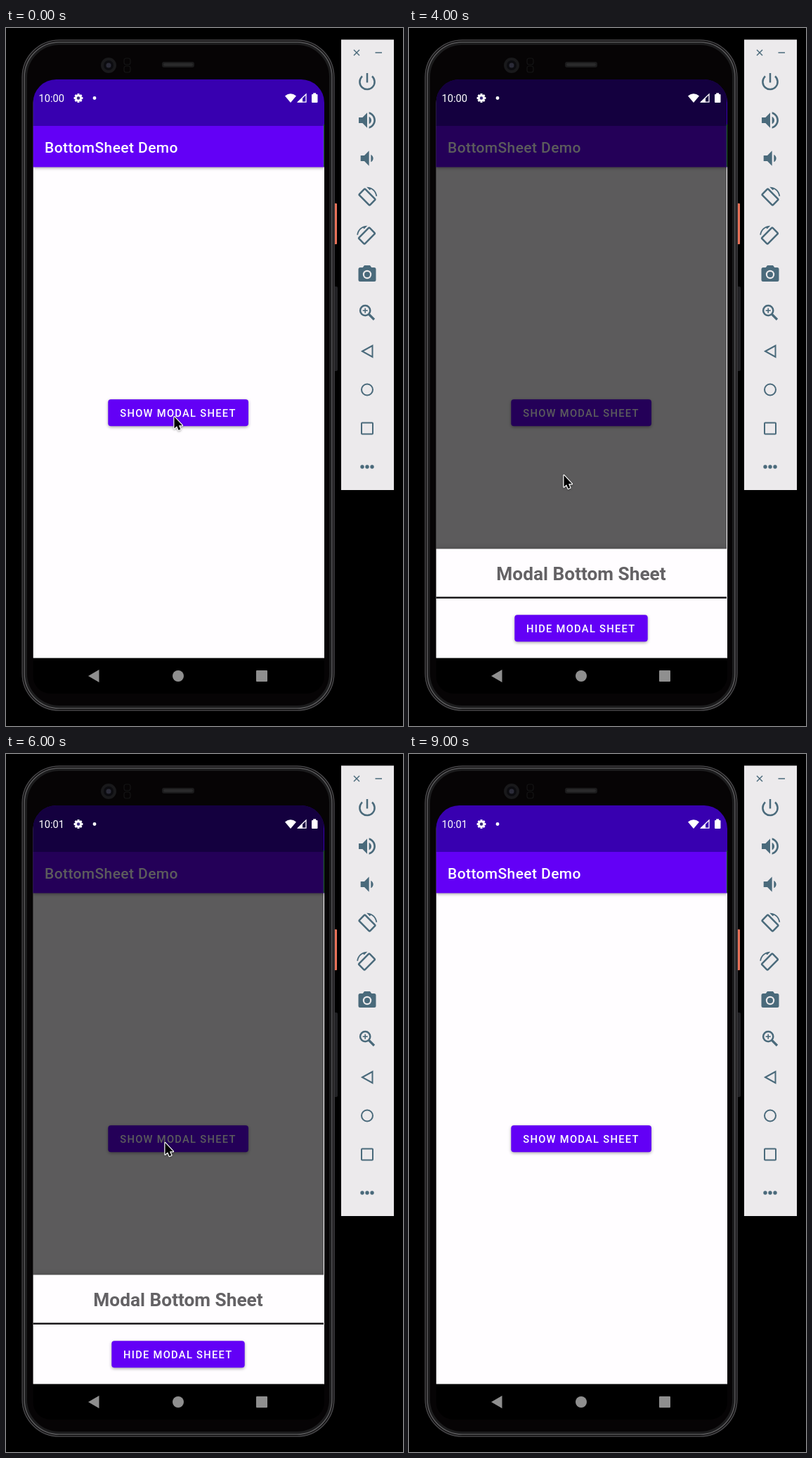
Recreate the animation shown at these times as an HTML page with a canvas. Size 565 px wide and 991 px high, loop 9100 ms.

```html
<!DOCTYPE html>
<html lang="en">
<head>
<meta charset="utf-8">
<title>BottomSheet Demo</title>
<style>
html, body { margin: 0; width: 100%; height: 100%; overflow: hidden; background: #000; }
canvas { display: block; width: 565px; height: 991px; }
</style>
</head>
<body>
<canvas id="stage" width="565" height="991"></canvas>
<script>
const W = 565, H = 991, LOOP = 9100, STEP = 100;
const FONT = 'Roboto, "Noto Sans", sans-serif';
const PURPLE = '#6300f6', SLATE = '#4a6a7b', PANEL = '#eceaec';
const SCREEN = { x: 38.5, y: 73, r: 453, b: 945 };
const NAV_Y = 894.5, SHEET_Y = 739.5, TRAVEL = 150, DIM = 0.64;

const stage = document.getElementById('stage').getContext('2d');

function layer(draw) {
  const c = document.createElement('canvas');
  c.width = W;
  c.height = H;
  draw(c.getContext('2d'));
  return c;
}

function box(g, x, y, w, h, r, fill) {
  g.beginPath();
  g.roundRect(x, y, w, h, r);
  g.fillStyle = fill;
  g.fill();
}

function ring(g, x, y, w, h, r, color, width) {
  g.beginPath();
  g.roundRect(x, y, w, h, r);
  g.strokeStyle = color;
  g.lineWidth = width;
  g.stroke();
}

function disc(g, x, y, r, fill) {
  g.beginPath();
  g.arc(x, y, r, 0, 7);
  g.fillStyle = fill;
  g.fill();
}

function arc(g, x, y, r, from, to, color, width) {
  g.beginPath();
  g.arc(x, y, r, from, to);
  g.strokeStyle = color;
  g.lineWidth = width;
  g.stroke();
}

function trace(g, pts, closed) {
  g.beginPath();
  pts.forEach(([x, y], i) => i ? g.lineTo(x, y) : g.moveTo(x, y));
  if (closed) g.closePath();
}

function poly(g, pts, fill) {
  trace(g, pts, true);
  g.fillStyle = fill;
  g.fill();
}

function line(g, pts, color, width, closed) {
  trace(g, pts, closed);
  g.strokeStyle = color;
  g.lineWidth = width;
  g.stroke();
}

function text(g, str, x, y, weight, size, color, spacing = 0, align = 'left') {
  g.font = `${weight} ${size}px ${FONT}`;
  g.letterSpacing = spacing + 'px';
  g.textAlign = align;
  g.fillStyle = color;
  g.fillText(str, x, y);
}

function button(g, label, x, y, w, tx) {
  g.save();
  g.shadowColor = 'rgba(0,0,0,.35)';
  g.shadowBlur = 4;
  g.shadowOffsetY = 1.5;
  box(g, x, y, w, 38, 4, PURPLE);
  g.restore();
  text(g, label, tx, y + 25, 500, 14.7, '#fff', 1.28);
}

// 24-unit icon path centred on (x, y)
function icon(g, d, x, y, scale) {
  g.save();
  g.translate(x, y);
  g.scale(scale, scale);
  g.translate(-12, -12);
  g.fillStyle = SLATE;
  g.fill(new Path2D(d));
  g.restore();
}

function rotateIcon(g, x, y, flip) {
  g.save();
  g.translate(x, y);
  g.scale(flip, 1);
  icon(g, 'M16.48 2.52c3.27 1.55 5.61 4.72 5.97 8.48h1.5C23.44 4.84 18.29 0 12 0l-.66.03 3.81 3.81 1.33-1.32z', 0, 0, 1.19);
  g.rotate(Math.PI / 4);
  ring(g, -10.8, -6, 21.6, 12, 1.5, SLATE, 2.5);
  g.restore();
}

// Concentric outline of the phone body
function rim(g, inset, color, width) {
  ring(g, 22 + inset, 16 + inset, 446 - 2 * inset, 954 - 2 * inset, 54 - inset, color, width);
}

function drawPhone(g) {
  g.fillStyle = '#000';
  g.fillRect(0, 0, W, H);
  box(g, 466, 367, 6, 120, 2, '#222225');
  box(g, 466, 249, 5, 58, 1, '#ea7259');
  box(g, 22, 16, 446, 954, 54, '#060405');
  rim(g, 6, '#1c1c1d', 4);
  rim(g, 4, '#58585a', 1.6);
  rim(g, 1.2, '#444446', 1.6);

  disc(g, 146, 53, 11, '#19191b');
  disc(g, 146, 53, 7, '#0c0c10');
  disc(g, 146, 53, 3.5, '#2b2b38');
  ring(g, 168, 43, 9, 9, 3, '#141415', 1.2);
  ring(g, 168, 54, 9, 9, 3, '#141415', 1.2);
  box(g, 222, 48, 46, 8, 3, '#1b1b1c');
  box(g, 224, 50, 42, 4, 2, '#2a2a2b');
}

function drawToolbar(g) {
  const cx = 514;
  g.fillStyle = PANEL;
  g.fillRect(477, 16.5, 75, 639.5);
  line(g, [[495, 31], [503, 39]], SLATE, 1.4);
  line(g, [[503, 31], [495, 39]], SLATE, 1.4);
  line(g, [[525.5, 35], [535, 35]], SLATE, 1.5);

  arc(g, cx, 76.5, 10.6, -0.85, Math.PI + 0.85, SLATE, 2.5);
  line(g, [[cx, 64], [cx, 77.5]], SLATE, 2.5);

  const wave = 'm13.5 3c0-1.77-1.02-3.29-2.5-4.03v8.05c1.48-.73 2.5-2.25 2.5-4.02z';
  icon(g, 'M3 9v6h4l5 5V4L7 9H3z' + wave +
    'M14 3.23v2.06c2.89.86 5 3.54 5 6.71s-2.11 5.85-5 6.71v2.06c4.01-.91 7-4.49 7-8.77s-2.99-7.86-7-8.77z',
    cx, 131, 1.33);
  icon(g, 'M5 9v6h4l5 5V4L9 9H5z' + wave, cx, 185, 1.33);

  rotateIcon(g, cx, 240, 1);
  rotateIcon(g, cx - 0.5, 295, -1);

  poly(g, [[507, 341], [510, 337], [518, 337], [521, 341]], SLATE);
  box(g, 501.5, 340, 25, 20, 2.5, SLATE);
  disc(g, cx, 350, 6.2, PANEL);
  disc(g, cx, 350, 4, SLATE);

  arc(g, 511.2, 401.2, 7.1, 0, 7, SLATE, 2.5);
  line(g, [[516.5, 406.5], [524, 414]], SLATE, 3.2);
  line(g, [[507.7, 401.2], [514.7, 401.2]], SLATE, 1.6);
  line(g, [[511.2, 397.7], [511.2, 404.7]], SLATE, 1.6);

  line(g, [[507, 459], [521.5, 451], [521.5, 467]], SLATE, 2, true);
  arc(g, cx, 513.5, 8, 0, 7, SLATE, 2);
  ring(g, 506, 560.5, 16, 16, 1, SLATE, 2);
  for (const dx of [-7, 0, 7]) disc(g, cx + dx, 623, 2.7, SLATE);
}

function drawApp(g) {
  const w = SCREEN.r - SCREEN.x;
  g.fillStyle = '#000';
  g.fillRect(SCREEN.x, SCREEN.y, w, SCREEN.b - SCREEN.y);
  g.fillStyle = '#fffdff';
  g.fillRect(SCREEN.x, SCREEN.y, w, NAV_Y - SCREEN.y);
  g.save();
  g.shadowColor = 'rgba(0,0,0,.35)';
  g.shadowBlur = 4;
  g.shadowOffsetY = 1;
  g.fillStyle = PURPLE;
  g.fillRect(SCREEN.x, 139, w, 58.5);
  g.restore();
  g.fillStyle = '#3800b0';
  g.fillRect(SCREEN.x, SCREEN.y, w, 66);
  text(g, 'BottomSheet Demo', 55, 177, 500, 21, '#fff', 0.4);
  button(g, 'SHOW MODAL SHEET', 145.3, 527.3, 199.7, 162.3);
}

function drawSheet(g) {
  const w = SCREEN.r - SCREEN.x;
  g.save();
  g.beginPath();
  g.rect(0, 0, W, NAV_Y);
  g.clip();
  g.shadowColor = 'rgba(0,0,0,.3)';
  g.shadowBlur = 8;
  g.fillStyle = '#fffdff';
  g.fillRect(SCREEN.x, SHEET_Y, w, NAV_Y - SHEET_Y);
  g.restore();
  text(g, 'Modal Bottom Sheet', 245, 784, 700, 26.25, '#646265', 0, 'center');
  g.fillStyle = '#1b191b';
  g.fillRect(SCREEN.x, 807.5, w - 1, 2.5);
  button(g, 'HIDE MODAL SHEET', 150.3, 833.3, 189.4, 167);
}

function drawStatus(g, clock) {
  text(g, clock, 46.5, 105, 400, 14.7, '#fff');
  for (let i = 0; i < 4; i++) {
    const a = i * Math.PI / 4, dx = 6.4 * Math.cos(a), dy = 6.4 * Math.sin(a);
    line(g, [[103 - dx, 99.5 - dy], [103 + dx, 99.5 + dy]], '#fff', 3);
  }
  disc(g, 103, 99.5, 5, '#fff');
  disc(g, 103, 99.5, 2.2, '#3a2a80');
  disc(g, 126, 99.5, 2.4, '#fff');

  g.beginPath();
  g.moveTo(405, 106);
  g.lineTo(397, 96.5);
  g.quadraticCurveTo(405, 90, 413, 96.5);
  g.fillStyle = '#fff';
  g.fill();
  line(g, [[415.5, 105.2], [427, 105.2], [427, 94]], '#fff', 1.3, true);
  poly(g, [[415, 105.5], [422, 105.5], [422, 99]], '#fff');
  box(g, 435, 94, 8.5, 12, 1, '#fff');
  g.fillRect(437.2, 92.3, 4, 2);
}

function drawNav(g) {
  const c = 'rgba(255,255,255,.56)';
  poly(g, [[117, 920], [132.5, 911], [132.5, 929]], c);
  disc(g, 245, 920, 8, c);
  box(g, 356, 912, 16, 16, 1, c);
}

function drawCursor(g, x, y) {
  g.save();
  g.translate(x, y + 1);
  g.scale(0.92, 0.92);
  g.lineJoin = 'round';
  g.shadowColor = 'rgba(0,0,0,.35)';
  g.shadowBlur = 3;
  g.shadowOffsetY = 1;
  const arrow = [[0.5, 0], [0.5, 18], [4.5, 14.4], [7.2, 20.6], [10.2, 19.3], [7.6, 13.3], [13, 13.3]];
  line(g, arrow, '#fff', 2.6, true);
  g.shadowColor = 'transparent';
  poly(g, arrow, '#000');
  g.restore();
}

const clamp = v => Math.max(0, Math.min(1, v));
const ease = u => u * u * (3 - 2 * u);

// [time, x, y] of the pointer tip
const path = [
  [0, 239, 551], [1100, 239, 551], [1500, 237, 544], [3200, 237, 544],
  [3900, 220, 634], [4400, 220, 634], [5100, 226, 551], [6100, 226, 551],
  [6800, 243, 866], [7100, 243, 853], [8500, 243, 853]
];

function pointer(t) {
  const i = path.findIndex(k => k[0] > t);
  if (i < 1) return null;
  const [t0, x0, y0] = path[i - 1], [t1, x1, y1] = path[i];
  const u = ease((t - t0) / (t1 - t0));
  return [x0 + (x1 - x0) * u, y0 + (y1 - y0) * u];
}

const visits = [
  { open: 2200, close: 4078 },
  { open: 5300, close: 7146 }
];

function sheetState(t) {
  for (const { open, close } of visits) {
    if (t < open) break;
    const shown = clamp((t - open) / 208), left = clamp(1 - (t - close) / 250);
    if (left > 0) return { p: shown * left, dim: DIM * shown ** 2 * left ** 1.15 };
  }
  return { p: 0, dim: 0 };
}

const phone = layer(g => { drawPhone(g); drawToolbar(g); });
const app = layer(drawApp);
const sheet = layer(drawSheet);

function render(t) {
  const g = stage, { p, dim } = sheetState(t);
  g.drawImage(phone, 0, 0);
  g.save();
  g.beginPath();
  g.roundRect(SCREEN.x, SCREEN.y, SCREEN.r - SCREEN.x, SCREEN.b - SCREEN.y, [33, 33, 25, 25]);
  g.clip();
  g.drawImage(app, 0, 0);
  g.fillStyle = `rgba(0,0,0,${dim})`;
  g.fillRect(SCREEN.x, SCREEN.y, 452 - SCREEN.x, NAV_Y - SCREEN.y);
  if (p > 0) {
    g.globalAlpha = p;
    g.drawImage(sheet, 0, Math.round(TRAVEL * (1 - p) ** 1.07));
    g.globalAlpha = 1;
  }
  g.fillStyle = '#1f6a2c';
  g.fillRect(452, 137, 1, 60);
  drawStatus(g, t < 4800 ? '10:00' : '10:01');
  drawNav(g);
  g.restore();
  const tip = pointer(t);
  if (tip) drawCursor(g, ...tip);
}

const start = performance.now();
function tick() {
  const t = (performance.now() - start) % LOOP;
  render(Math.floor(t / STEP) * STEP);
  requestAnimationFrame(tick);
}
tick();
</script>
</body>
</html>
```
